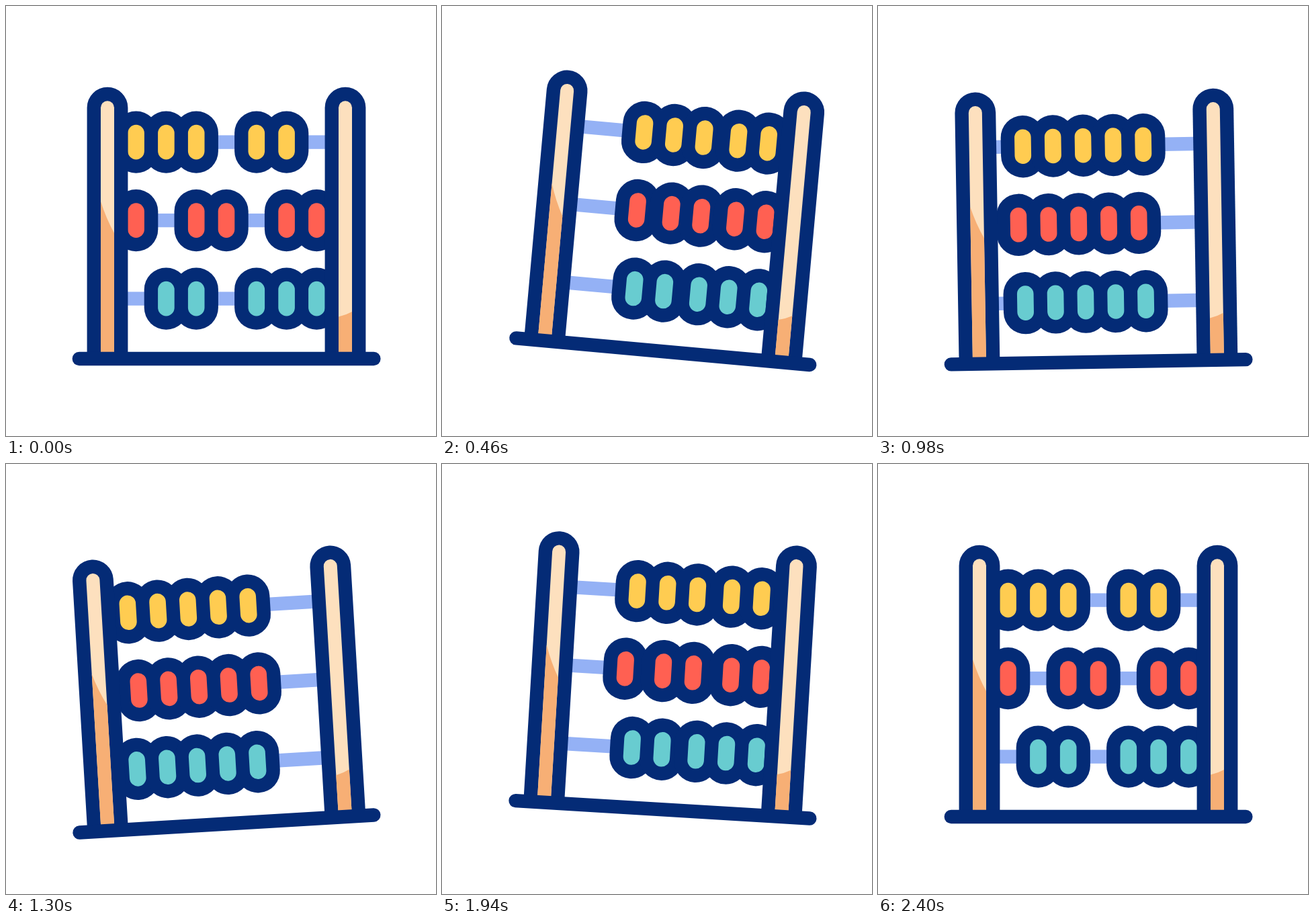
Animation of 640x640 px, one loop 2.62 s. Source, as an HTML page with a canvas:

```html
<!DOCTYPE html>
<html lang="en">
<head>
<meta charset="utf-8">
<title>Abacus</title>
<style>
  html, body { margin: 0; width: 100%; height: 100%; overflow: hidden; background: #fff; }
  canvas { display: block; width: 640px; height: 640px; }
</style>
</head>
<body>
<canvas id="stage" width="640" height="640"></canvas>
<script>
const ctx = document.getElementById('stage').getContext('2d');

const LOOP = 2620, STEP = 20;
const NAVY = '#042b76', ROD = '#94b1f5', CREAM = '#fde0be', ORANGE = '#f7af75';
const LINE = 20.4;
const PIVOT = { x: 505, y: 525 };
const POSTS = [151, 505];
const FIRST_SLOT = 193.6, PITCH = 44.8;

const SWING_TIMES = [0, 600, 1200, 1800, 2400];
const RED_TIMES = [0, 600, 1140, 1740, 2340];

// Each row: resting slots of its five beads; they pack right, left, right, then return.
const ROWS = [
  { y: 202.6, color: '#ffcc51', slots: [0, 1, 2, 4, 5], times: SWING_TIMES },
  { y: 319.1, color: '#ff6052', slots: [0, 2, 3, 5, 6], times: RED_TIMES },
  { y: 435.6, color: '#68ccd0', slots: [1, 2, 4, 5, 6], times: SWING_TIMES }
];

const smooth = u => u * u * (3 - 2 * u);

function tween(t, times, values) {
  const last = times.length - 1;
  if (t >= times[last]) return values[last];
  const i = times.findIndex(end => end > t) - 1;
  const u = (t - times[i]) / (times[i + 1] - times[i]);
  return values[i] + (values[i + 1] - values[i]) * smooth(u);
}

function capsule(x, y, halfW, halfH, color) {
  ctx.fillStyle = color;
  ctx.beginPath();
  ctx.roundRect(x - halfW, y - halfH, halfW * 2, halfH * 2, halfW);
  ctx.fill();
}

function drawRow({ y, color, slots, times }, t) {
  ctx.fillStyle = ROD;
  ctx.fillRect(POSTS[0], y - LINE / 2, POSTS[1] - POSTS[0], LINE);
  const centers = slots.map((slot, i) =>
    FIRST_SLOT + PITCH * tween(t, times, [slot, i + 2, i, i + 2, slot]));
  for (const x of centers) capsule(x, y, 32.7, 46.2, NAVY);
  for (const x of centers) capsule(x, y, 12.3, 25.8, color);
}

function postShape(x, halfW, bottom, color) {
  ctx.fillStyle = color;
  ctx.beginPath();
  ctx.arc(x, 151.2, halfW, Math.PI, 0);
  ctx.lineTo(x + halfW, bottom);
  ctx.lineTo(x - halfW, bottom);
  ctx.fill();
}

function drawPost(x, shadeLeft, bendX, bendY, shadeRight) {
  const half = 10;
  postShape(x, half + LINE, 525, NAVY);
  postShape(x, half, 525, CREAM);
  ctx.fillStyle = ORANGE;
  ctx.beginPath();
  ctx.moveTo(x - half, shadeLeft);
  ctx.quadraticCurveTo(x + bendX, bendY, x + half, shadeRight);
  ctx.lineTo(x + half, 525);
  ctx.lineTo(x - half, 525);
  ctx.fill();
}

function drawBase() {
  ctx.strokeStyle = NAVY;
  ctx.lineWidth = LINE;
  ctx.lineCap = 'round';
  ctx.beginPath();
  ctx.moveTo(108.8, 525);
  ctx.lineTo(547.4, 525);
  ctx.stroke();
}

function draw(t) {
  const angle = tween(t, SWING_TIMES, [0, 6, -4, 4, 0]) * Math.PI / 180;
  const drop = tween(t, SWING_TIMES, [0, 6, 0, 0, 0]);
  ctx.fillStyle = '#fff';
  ctx.fillRect(0, 0, 640, 640);
  ctx.save();
  ctx.translate(PIVOT.x, PIVOT.y + drop);
  ctx.rotate(angle);
  ctx.translate(-PIVOT.x, -PIVOT.y);
  for (const row of ROWS) drawRow(row, t);
  drawPost(POSTS[0], 291, -2, 316, 338);
  drawPost(POSTS[1], 462.5, 1, 460, 455);
  drawBase();
  ctx.restore();
}

const start = performance.now();

function tick() {
  const t = (performance.now() - start) % LOOP;
  draw(Math.floor(t / STEP) * STEP);
  requestAnimationFrame(tick);
}
tick();
</script>
</body>
</html>
```
